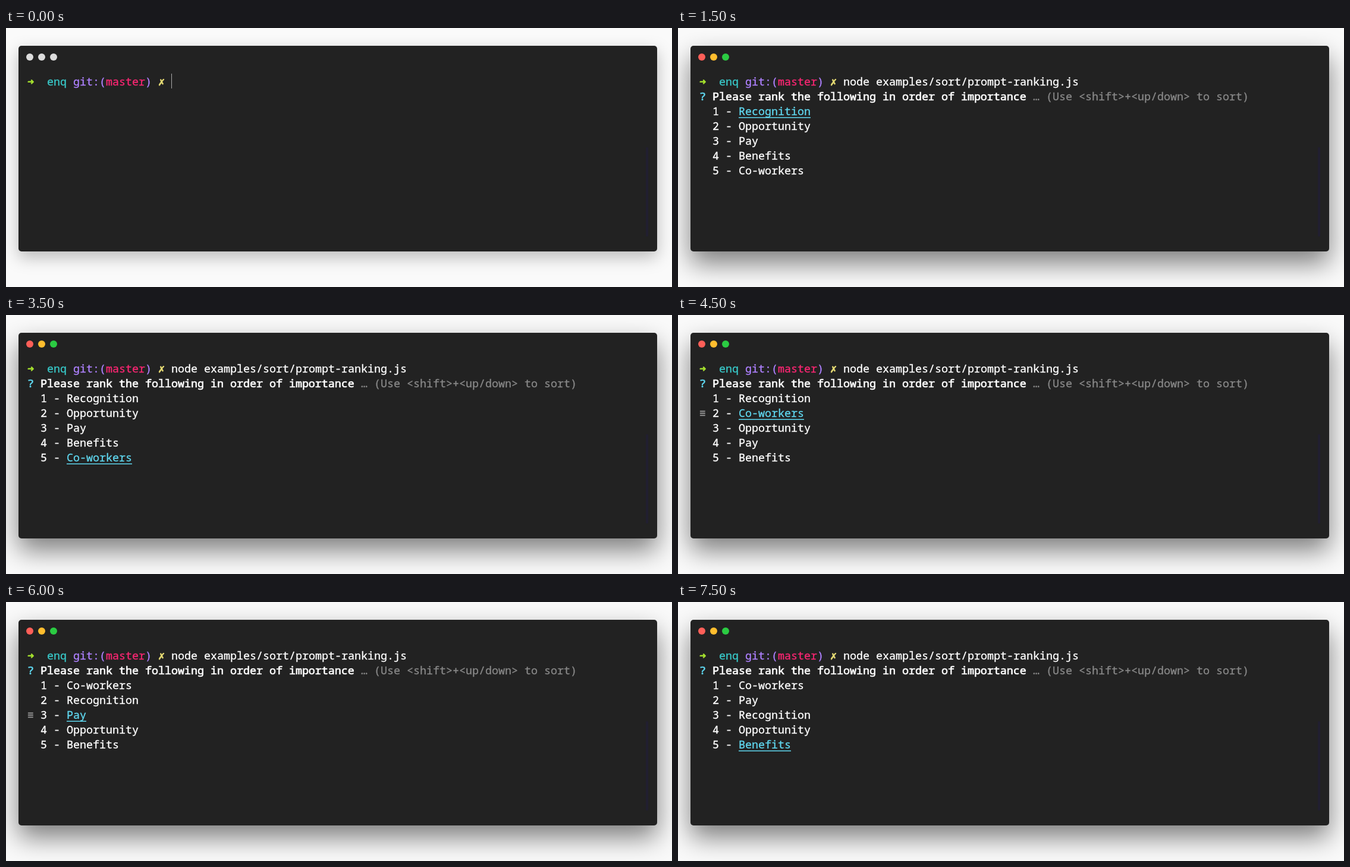
An HTML page for the animation above (8000 ms loop, 1120 px wide and 437 px high).

```html
<!DOCTYPE html>
<html lang="en">
<head>
<meta charset="utf-8">
<title>Ranking prompt</title>
<style>
  html, body { margin: 0; width: 100%; height: 100%; overflow: hidden; background: #fafafa; }
  #window {
    position: absolute; left: 21px; top: 30px; width: 1074px; height: 347px;
    border-radius: 5px; background: #222; box-shadow: 0 20px 44px rgba(0, 0, 0, .5);
  }
  #window.idle { box-shadow: 0 10px 28px rgba(0, 0, 0, .26); }
  .dot { position: absolute; top: 13px; width: 12px; height: 12px; border-radius: 50%; }
  .idle .dot { background: #dcdcdc !important; }
  #scrollbar { position: absolute; left: 1055px; top: 171px; width: 4px; height: 151px; border-radius: 2px; background: #211f30; }
  #cursor { position: absolute; top: 47px; width: 1px; height: 25px; background: #aaa; }
  #screen span {
    position: absolute; white-space: pre; height: 25px;
    font: 18.333px/25px "Noto Sans Mono", "DejaVu Sans Mono", monospace;
    -webkit-text-stroke: .35px;
  }
  #screen .strong { -webkit-text-stroke: .7px; }
  #screen .active { box-shadow: inset 0 -1.5px #5fd7ef; }
</style>
</head>
<body>
<div id="window">
  <div class="dot" style="left:13px;background:#ff5f58"></div>
  <div class="dot" style="left:33px;background:#ffbd2e"></div>
  <div class="dot" style="left:53px;background:#2bcb42"></div>
  <div id="scrollbar"></div>
  <div id="screen"></div>
  <div id="cursor"></div>
</div>
<script>
const LOOP = 8000, CELL = 11, LINE = 25, LEFT = 15, TOP = 47;
const WHITE = "#fff", CYAN = "#5fd7ef", PURPLE = "#ae81ff";
const [R, O, P, B, C] = ["Recognition", "Opportunity", "Pay", "Benefits", "Co-workers"];
const win = document.getElementById("window");
const terminal = document.getElementById("screen");
const cursor = document.getElementById("cursor");

// [start time, active row, choices (if reordered), dragging]
const steps = [
  [1500, 0, [R, O, P, B, C]],
  [2500, 1], [3000, 2], [3500, 4],
  [4000, 3, [R, O, P, C, B], true],
  [4250, 2, [R, O, C, P, B], true],
  [4500, 1, [R, C, O, P, B], true],
  [4750, 0, [C, R, O, P, B], true],
  [5000, 1], [5250, 2], [5500, 3],
  [6000, 2, [C, R, P, O, B], true],
  [6500, 1, [C, P, R, O, B], true],
  [7000, 3], [7500, 4],
];

function put(row, col, text, color = WHITE, className = "") {
  const span = document.createElement("span");
  span.textContent = text;
  span.className = className;
  span.style.cssText = `left:${LEFT + col * CELL}px;top:${TOP + row * LINE}px;color:${color}`;
  terminal.append(span);
}

function drawPrompt(t) {
  put(1, 0, "?", CYAN, "strong");
  put(1, 2, "Please rank the following in order of importance", WHITE, "strong");
  put(1, 51, "… (Use <shift>+<up/down> to sort)", "#888");
  let choices, active, dragging;
  for (const [start, row, order, drag] of steps) {
    if (t < start) break;
    choices = order || choices;
    active = row;
    dragging = drag;
  }
  choices.forEach((name, i) => {
    put(i + 2, 2, `${i + 1} -`);
    if (i === active) put(i + 2, 6, name, CYAN, "active");
    else put(i + 2, 6, name);
  });
  if (dragging) put(active + 2, 0, "≡", "#999");
}

function draw(t) {
  win.className = t < 500 ? "idle" : "";
  terminal.replaceChildren();
  put(0, 0, "➜", "#a6e22e", "strong");
  put(0, 3, "enq", "#38c8c8");
  put(0, 7, "git:(", PURPLE);
  put(0, 12, "master", "#f92672");
  put(0, 18, ")", PURPLE);
  put(0, 20, "✗", "#e6db74", "strong");
  if (t >= 1000) put(0, 22, "node examples/sort/prompt-ranking.js");
  cursor.style.left = LEFT + CELL * (t < 1000 ? 22 : 58) + "px";
  cursor.hidden = t >= 1500;
  if (t >= 1500) drawPrompt(t);
}

let shown = -1;
function tick(now) {
  const slot = Math.floor(now % LOOP / 250);
  if (slot !== shown) draw((shown = slot) * 250);
  requestAnimationFrame(tick);
}
draw(0);
requestAnimationFrame(tick);
</script>
</body>
</html>
```
